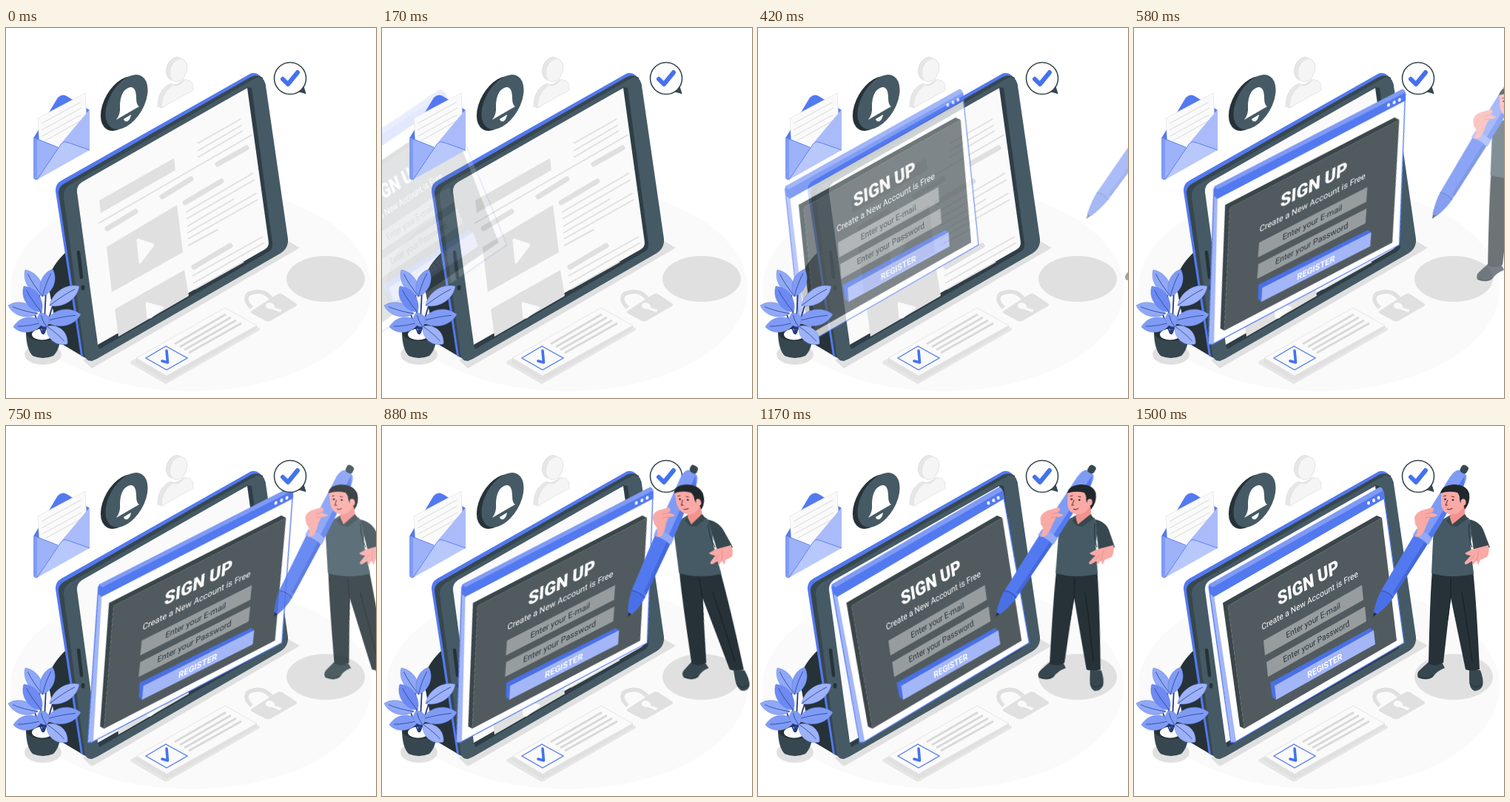
Write an HTML page that moves like this. It is 500x500 px and loops after 1540 ms.

```html
<!DOCTYPE html>
<html lang="en">
<head>
<meta charset="utf-8">
<title>Sign up</title>
<style>
  html, body { margin: 0; width: 100%; height: 100%; overflow: hidden; background: #fff; }
  svg { display: block; width: 100vw; height: 100vh; }
  text { font-family: Roboto, Inter, sans-serif; }
  .slide { transform-box: fill-box; transform-origin: center; }
  .line { fill: none; stroke: #e0e0e0; stroke-width: 2; }
  .pill { fill: none; stroke: #e0e0e0; stroke-width: 7; stroke-linecap: round; }
  .round { stroke-linejoin: round; stroke-linecap: round; }
</style>
</head>
<body>
<svg viewBox="0 0 500 500">
  <ellipse cx="250" cy="352" rx="244" ry="139" fill="#fafafa"/>
  <ellipse cx="432" cy="339" rx="53" ry="31" fill="#e0e0e0"/>

  <!-- tablet -->
  <path d="M104 449L116 460L397 297L378 286Z" fill="#e0e0e0"/>
  <path d="M82 302Q62 320 56 342L72 425L104 444Z" fill="#263238"/>
  <path d="M67 221Q66 211 75 206L328 63Q335 58 343 64L351 76L116 449L101 443Z" fill="#5379f0"/>
  <path d="M71 224Q70 215 79 210L331 66Q339 62 347 67L378 290L116 450L104 444Z" fill="#37474f"/>
  <path d="M78 228Q77 218 86 212L335 69Q348 62 351 78L381 285Q382 298 370 305L123 447Q108 455 106 440Z" fill="#455a64"/>
  <path d="M110 212L326 80L332 81L360 291Q361 299 354 303L126 434L122 420Z" fill="#2f3e46"/>
  <path d="M96 222Q95 213 103 208L326 81L355 290Q355 296 350 299L124 428Z" fill="#fafafa"/>
  <path d="M98 303L102 337" stroke="#263238" stroke-width="4.5" stroke-linecap="round"/>
  <ellipse cx="104" cy="351" rx="2.6" ry="3.6" fill="#263238"/>

  <!-- page on the tablet -->
  <path d="M126 233L227 176L229 192L128 250ZM136 296L231 239L239 303L143 357ZM147 380L241 327L247 362L152 417Z" fill="#e0e0e0"/>
  <path class="line" d="M125 264L333 144M259 156L317 123M259 166L319 131M259 175L320 139
    M243 249L334 196M244 258L336 205M245 268L308 231M245 277L339 223M246 285L340 232M246 294L287 272
    M252 335L347 282M253 345L349 290M255 353L321 316"/>
  <path class="pill" d="M137 271L175 248M211 228L250 204M286 184L325 162M242 236L291 207M254 323L303 294"/>
  <path class="round" d="M178 286L199 293L181 317Z" fill="#fafafa" stroke="#fafafa" stroke-width="3"/>
  <path class="round" d="M190 372L212 378L195 391L192 391Z" fill="#fafafa" stroke="#fafafa" stroke-width="3"/>

  <!-- lock -->
  <g transform="translate(2 0)">
    <path d="M330 378C320 369 320 359 333 357C345 354 352 360 360 369" fill="none" stroke="#e0e0e0" stroke-width="5.5"/>
    <path class="round" d="M331 384L365 362Q368 360 371 362L389 374L356 393Q353 395 350 394Z" fill="#e0e0e0" stroke="#e0e0e0" stroke-width="4"/>
    <path d="M349 374Q352 369 358 372Q362 375 361 378L371 381L368 384L358 380Q348 380 349 374Z" fill="#fafafa"/>
  </g>

  <!-- card -->
  <path class="round" d="M170 452L296 381L341 407L216 479Z" fill="#e6e6e6" stroke="#e6e6e6" stroke-width="4"/>
  <path d="M176 446L217 470L339 402V407L217 477L176 453Z" fill="#e0e0e0"/>
  <path d="M176 446L296 378L339 402L217 470Z" fill="#fafafa" stroke="#e6e6e6"/>
  <path d="M228 427L297 387M235 431L304 391M241 435L311 395M247 439L318 399" stroke="#d9d9d9" stroke-width="3"/>
  <path d="M189 446L216 430L245 446L217 462Z" fill="none" stroke="#5379f0" stroke-width="1.3"/>
  <path class="round" d="M211 450L218.500 452L217 436" fill="none" stroke="#4472ee" stroke-width="3.600"/>

  <!-- sign-up window -->
  <g id="form" class="slide">
    <path d="M101 217L337 88L365 293L136 427.500H131Z" fill="#fff"/>
    <path d="M101 217L107 222L138 426L132 428Z" fill="#a3b6f8"/>
    <path class="round" d="M337 90L365 293L136 427.500H131L101 217" fill="none" stroke="#5379f0" stroke-width="1.300"/>
    <path d="M101 214L331 83Q335 82 337 88L106 219Z" fill="#7f9bf5"/>
    <path d="M101 214L106 218L337 87L339 98L108 231L103 227Z" fill="#5379f0"/>
    <g fill="#fff">
      <ellipse cx="317" cy="104" rx="1.900" ry="2.500"/>
      <ellipse cx="324" cy="100.500" rx="1.900" ry="2.500"/>
      <ellipse cx="330.500" cy="97" rx="1.900" ry="2.500"/>
    </g>
    <g fill="#263238">
      <path d="M127 243L335 124L355 290L149 409Z" opacity=".8"/>
      <path d="M120 239L328 121L335 124L127 243L149 409L143 406Z" opacity=".9"/>
    </g>
    <path d="M175 290L308 215L310 235L177 310ZM179 319L312 244L314 264L181 339Z" fill="#fff" opacity=".4"/>
    <path d="M184 347L319 273L324 276L190 351L192 370L187 366Z" fill="#4a70e8"/>
    <path d="M190 351L324 276L326 295L192 370Z" fill="#a3b6f8"/>
    <g id="labels"></g>
  </g>

  <!-- envelope -->
  <path d="M37 149L70 94Q76 88 82 92L113 111L78 170Z" fill="#5379f0"/>
  <path d="M43 122L107 88L110 150L76 180L46 165Z" fill="#fafafa" stroke="#e6e6e6" stroke-width=".8"/>
  <path d="M48 129L101 100M48 138L102 108M49 146L102 117M53 152L102 125" class="line" style="stroke-width:1.2"/>
  <path d="M37 148L42 150V205Q37 206 37 201Z" fill="#7f9bf5"/>
  <path d="M42 150L72 162L42 205Z" fill="#9db2f8"/>
  <path d="M113 110V165L76 154Z" fill="#a9bbf9"/>
  <path d="M42 205L75 156Q78 153 82 154L113 165Z" fill="#b9c8fb"/>
  <path d="M42 150L70 161M42 205L75 156Q78 153 82 154L113 165" fill="none" stroke="#5379f0" stroke-width=".9"/>

  <!-- bell -->
  <circle r="33" transform="matrix(.866 -.5 0 1 156.500 102)" fill="#263238"/>
  <circle r="33" transform="matrix(.866 -.5 0 1 163 100)" fill="#455a64"/>
  <path d="M149 124Q155 116 154 106C154 93 158 84 165 81C173 77 176 85 176 94Q176 104 180 106Z" fill="#fff"/>
  <path d="M159 123L169 117Q168 124 164 126Q160 127 159 123Z" fill="#fff"/>

  <!-- user -->
  <g stroke="#e0e0e0" stroke-width=".8">
    <ellipse cx="228.500" cy="55" rx="11.500" ry="16" transform="rotate(20 228.500 55)" fill="#e6e6e6"/>
    <ellipse cx="233" cy="57" rx="11" ry="16" transform="rotate(20 233 57)" fill="#f5f5f5"/>
    <path d="M205 106C205 91 210 81 222 75Q230 80 240 69L250 75L211 108Z" fill="#e6e6e6"/>
    <path d="M210 108C210 95 215 83 226 77Q234 80 241 70C250 69 254 75 253 84Z" fill="#f5f5f5"/>
  </g>

  <!-- check bubble -->
  <path d="M396 86L405 88.500L402 79Z" fill="#37474f" stroke="#37474f" class="round"/>
  <circle cx="384" cy="68" r="21.500" fill="#fff" stroke="#37474f" stroke-width="1.600"/>
  <path class="round" d="M374 69L381 76L394 60" fill="none" stroke="#4472ee" stroke-width="6"/>

  <!-- plant -->
  <ellipse cx="50" cy="441" rx="25" ry="14" fill="#e0e0e0"/>
  <path d="M27 411C27 427 31 438 36 443Q50 449 64 443C70 437 74 427 74 411Z" fill="#37474f"/>
  <ellipse cx="50.500" cy="411" rx="23.500" ry="12" fill="#263238"/>
  <ellipse cx="49" cy="414" rx="14" ry="7.500" fill="#fff"/>
  <path d="M50 414L45 360M51 414L54 355M49 413L38 385M52 412L64 372" fill="none" stroke="#263a80" stroke-width="1.800"/>
  <g id="leaves"></g>

  <!-- man with a pen -->
  <g id="man" class="slide">
    <path class="round" d="M387 329L399 318L417 321L420 327Q409 331 404 339Q396 345 384 340Q381 334 387 329Z" fill="#37474f"/>
    <path class="round" d="M453 330H468Q473 343 471 351Q468 358 460 358Q453 355 453 343Z" fill="#37474f"/>
    <path d="M384 339Q396 344 404 337M454 347Q460 358 471 348" fill="none" stroke="#263238"/>
    <path d="M403 195L458 194Q463 240 467 329Q457 332 448 329L428 232L418 320Q408 326 398 321Q400 230 403 195Z" fill="#263238"/>
    <path d="M428 205V232L424 262M443 225Q452 280 457 318" fill="none" stroke="#151e22"/>
    <path d="M453 126Q469 130 473 143L481 164L459 168Z" fill="#37474f"/>
    <path d="M405 133L428 120L452 124Q458 136 455 160L459 200Q430 207 402 199Z" fill="#455a64"/>
    <path d="M453 132Q451 150 457 164" fill="none" stroke="#263238"/>
    <path d="M460 166L479 161Q481 171 477 177L468 181L465 188L463 182L457 189L458 182L449 187Q446 187 447 184L455 175Q450 175 447 172L458 166Z" fill="#f9aaa6"/>
    <path d="M466 167L463 182M460 174L455 181" stroke="#e58a88" stroke-width=".8"/>
    <g transform="translate(323 258) rotate(-58.300)">
      <path d="M0 0L8-3V3Z" fill="#263238"/>
      <path d="M6-3Q24-9 37-9.500V9.500Q22 9 6 3Z" fill="#4a70e8"/>
      <path d="M36-9.500L124-11V11L36 9.500Z" fill="#5379f0"/>
      <path d="M36-9.500Q40 0 36 9.500" fill="none" stroke="#3554b8" stroke-width="1.500"/>
      <path d="M42 5.500L122 6V11L42 9.500Z" fill="#4468db"/>
      <path d="M132-11.500L216-11Q228-10 230-5V5Q228 10 216 11L132 11.500Z" fill="#7f9bf5"/>
      <path d="M132 5H228L216 11L132 11.500Z" fill="#5379f0"/>
      <path d="M122-12.500H132Q136 0 132 12.500H122Q126 0 122-12.500Z" fill="#93a9f8"/>
      <rect x="229" y="-5" width="11" height="10" rx="4" fill="#37474f"/>
    </g>
    <path d="M379 124Q381 117 389 114L403 110Q408 113 402 117L410 120Q409 123 401 123L396 132Q393 142 387 149L380 150Q386 138 380 133Z" fill="#f9aaa6"/>
    <path d="M403 117L394 119M401 123L393 124" stroke="#e58a88" stroke-width=".8"/>
    <path d="M428 113L447 108L447 121Q439 130 430 134L427 124Z" fill="#f3938f"/>
    <path d="M426 123L430 133L447 119L451 125L436 136L428 135L422 128Z" fill="#37474f"/>
    <path d="M415 90L437 86L448 95Q449 107 443 112Q437 121 426 119Q416 117 415 105Z" fill="#f9aaa6"/>
    <path d="M414 91Q416 80 432 79Q449 79 453 91Q455 103 447 113L445 105Q440 106 440 98Q440 93 437 90Q425 87 414 91Z" fill="#20282c"/>
    <ellipse cx="445" cy="103" rx="3.500" ry="4.500" fill="#f9aaa6"/>
    <path d="M418 95L422 94M429 95L433 96M424 100L421 107H424M423 112Q427 114 430 111" fill="none" stroke="#7a3434" stroke-width="1.100"/>
    <g fill="#20282c"><circle cx="420.500" cy="99" r="1.300"/><circle cx="431" cy="100" r="1.300"/></g>
  </g>
</svg>
<script>
const NS = 'http://www.w3.org/2000/svg';
const $ = id => document.getElementById(id);

function add(parent, tag, attrs, text = '') {
  const el = document.createElementNS(NS, tag);
  for (const key in attrs) el.setAttribute(key, attrs[key]);
  el.textContent = text;
  return parent.appendChild(el);
}

// Text lying on the isometric plane of the form.
function label(text, x, y, fill, size = 11.3, weight = 400) {
  add($('labels'), 'text', {
    fill, transform: `matrix(.866 -.485 .12 1 ${x} ${y})`,
    style: `font-size:${size}px;font-weight:${weight}`
  }, text);
}
label('SIGN UP', 195, 243, '#fff', 24.5, 900);
label('Create a New Account is Free', 173, 276, '#fff', 11.5);
label('Enter your E-mail', 206, 287, '#263238');
label('Enter your Password', 202, 320, '#263238');
label('REGISTER', 235, 341, '#fff', 11.7, 700);

// Base point, tip, half width, colour.
[
  [49, 362, 26, 327, 9, '#8fa8f7'],
  [49, 363, 63, 326, 9, '#7f9bf5'],
  [59, 375, 99, 349, 10, '#9db2f8'],
  [43, 386, 3, 375, 9, '#8fa8f7'],
  [48, 384, 24, 349, 10, '#6c8af2'],
  [54, 396, 101, 387, 11, '#7f9bf5'],
  [50, 398, 10, 404, 10, '#7f9bf5'],
  [55, 403, 83, 427, 10, '#9db2f8'],
  [55, 404, 46, 385, 8, '#7f9bf5']
].forEach(([x, y, tx, ty, w, fill]) => {
  const len = Math.hypot(tx - x, ty - y);
  const turn = Math.atan2(ty - y, tx - x) * 180 / Math.PI;
  const leaf = add($('leaves'), 'g', { transform: `translate(${x} ${y}) rotate(${turn})` });
  const side = s => `${len * .75} ${s * w * 1.35}`;
  add(leaf, 'path', {
    fill, stroke: '#5a78dc', 'stroke-width': .4,
    d: `M0 0C${len * .25} ${-w * 1.3} ${side(-1)} ${len} 0C${side(1)} ${len * .25} ${w * 1.3} 0 0Z`
  });
  add(leaf, 'path', { d: `M0 0Q${len * .5} -2 ${len * .85} 0`, fill: 'none', stroke: '#2f4796', 'stroke-width': .8 });
});

// Slide in from one side with a leaning overshoot; side is -1 (left) or 1 (right).
function slideIn(id, side, easing) {
  const skew = deg => `skewX(${deg * side}deg)`;
  const anim = $(id).animate([
    { offset: 0, opacity: 0, transform: `translate3d(${250 * side}px, 0, 0) ${skew(-20)}`, easing },
    { offset: .6, opacity: 1, transform: skew(10), easing },
    { offset: .8, transform: skew(-2), easing },
    { offset: 1, opacity: 1, transform: 'translate3d(0, 0, 0)' }
  ], { duration: 1500, fill: 'both' });
  anim.pause();
  return anim;
}
const moves = [
  slideIn('form', -1, 'cubic-bezier(.36, -.01, .5, 1.38)'),
  slideIn('man', 1, 'linear')
];

const LOOP = 1540, STEP = 1000 / 24, LEAD = 30;
const start = performance.now();

// The motion advances in 24 steps per second.
function draw() {
  const t = (performance.now() - start) % LOOP;
  const time = Math.min(1500, Math.floor((t + 5) / STEP) * STEP + LEAD);
  for (const anim of moves) anim.currentTime = time;
  requestAnimationFrame(draw);
}
draw();
</script>
</body>
</html>
```
